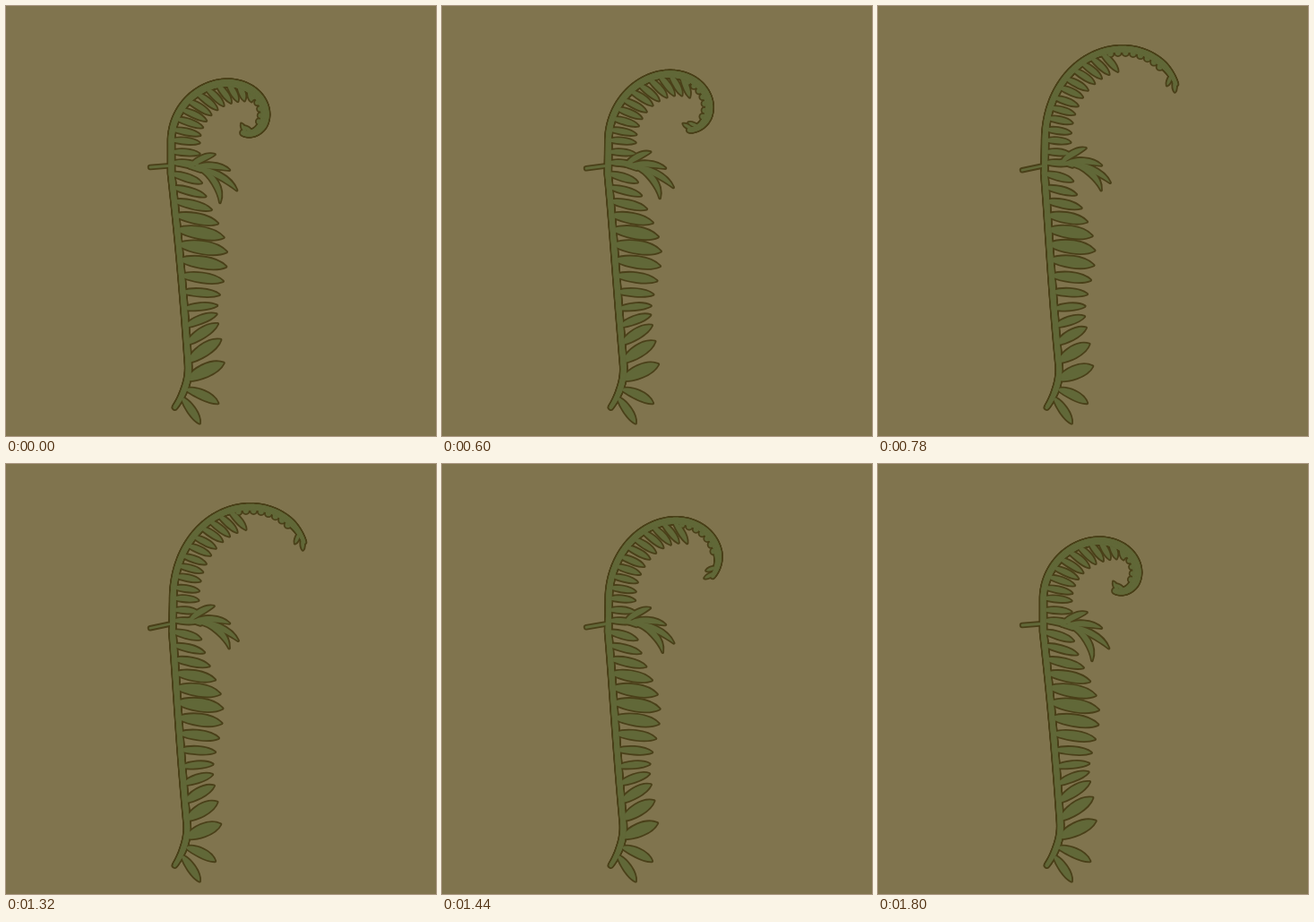
Animation of 480x480 px, one loop 2160 ms. Source, as an HTML page with a canvas:

```html
<!DOCTYPE html>
<html lang="en">
<head>
<meta charset="utf-8">
<title>Fern</title>
<style>
html, body { margin: 0; height: 100%; overflow: hidden; background: #80744e; }
canvas { display: block; width: 480px; height: 480px; }
</style>
</head>
<body>
<canvas id="stage" width="480" height="480"></canvas>
<script>
const ctx = document.getElementById('stage').getContext('2d');
const COLORS = { ground: '#80744e', line: '#4a4019', leaf: '#616838' };
const EDGE = 1.8;
const LOOP = 2160;
const FOOT = 448;   // y where the stem starts
const STEM = 296;   // height of the stem below the spiral

// The spiral's heading after s pixels is turn * s + curl * (s / 200) ^ power
const POSES = [
  { open: 0, turn: .86, curl: 125, power: 5, length: 199 },
  { open: .15, turn: .8, curl: 128, power: 5, length: 199 },
  { open: .25, turn: .72, curl: 88, power: 4, length: 214 },
  { open: .65, turn: .4, curl: 54, power: 2, length: 226 },
  { open: 1, turn: .3, curl: 52, power: 2, length: 234 }
];

// Start time and pose; a half value lies between two poses
const STEPS = [[0, 0], [420, 1], [600, 2], [720, 2.5], [780, 3], [900, 4],
  [1320, 3], [1440, 2.5], [1500, 2], [1620, 1], [1800, 0]];

// Side branch: angle and length of each leaf
const FAN = [[-27, 33], [3, 42], [28, 52], [59, 44]];

const mix = (a, b, k) => a + (b - a) * k;
const clamp = v => Math.max(0, Math.min(1, v));
const bell = (v, mid, spread) => Math.exp(-(((v - mid) / spread) ** 2));
const polar = (deg, len) => [Math.cos(deg * Math.PI / 180) * len, Math.sin(deg * Math.PI / 180) * len];

function poseAt(p) {
  const a = POSES[Math.floor(p)], b = POSES[Math.ceil(p)], out = {};
  for (const key in a) out[key] = mix(a[key], b[key], p % 1);
  return out;
}

function stemX(y, open) {
  const u = Math.max(0, (y - 187) / 213);
  const foot = Math.max(0, (y - 400) / 48);
  const sway = 3 * Math.sqrt(open) * Math.sin(4.2 * (FOOT - y) / STEM);
  return 184.5 + 19 * u + 5 * u * (1 - u) - 18 * foot ** 2 - sway;
}

// One point per pixel, from the foot to the end of the spiral
function spineOf({ open, turn, curl, power, length }) {
  const points = [], thick = mix(4.8, 2.8, open);
  for (let y = FOOT; y > FOOT - STEM; y--) {
    points.push({ x: stemX(y, open), y, heading: 0, r: mix(2, 3, clamp((FOOT - y) / 20)) });
  }
  let x = stemX(FOOT - STEM, open), y = FOOT - STEM;
  for (let s = 0; s <= length; s++) {
    const heading = turn * s + curl * (s / 200) ** power;
    const taper = mix(.55, 1, clamp((length - s) / 25));
    points.push({ x, y, heading, r: mix(3, thick, s / length) * taper });
    const [dx, dy] = polar(heading - 90, 1);
    x += dx;
    y += dy;
  }
  return points;
}

function leaf(x, y, [dx, dy], w, bend = 1) {
  const len = Math.hypot(dx, dy), ux = dx / len, uy = dy / len, reach = len - 1.5;
  const at = (k, off) => [x + ux * reach * k + uy * off, y + uy * reach * k - ux * off];
  const h = w * .67, path = new Path2D();
  path.moveTo(...at(0, 1.3));
  path.bezierCurveTo(...at(.22, bend + h * .8), ...at(.75, bend + h * 1.15), ...at(1, 0));
  path.bezierCurveTo(...at(.75, bend - h * 1.15), ...at(.22, bend - h * .8), ...at(0, -1.3));
  path.closePath();
  return { path };
}

function bud(x, y, r) {
  const path = new Path2D();
  path.arc(x, y, r, 0, 7);
  return { path };
}

function twig(x1, y1, x2, y2, r) {
  return { line: [{ x: x1, y: y1, r }, { x: x2, y: y2, r }] };
}

function stemLeaves(spine, open) {
  const count = 14, out = [];
  for (let i = 0; i < count; i++) {
    const t = i / (count - 1);
    const y = 417 - 230 * t - 10 * Math.sin(Math.PI * t);
    const dx = 33 + 22 * bell(t, .62, .25) + 9 * (1 - t) ** 9;
    const dy = 5 + 6 * t - 31 * bell(t, .1, .2);
    const w = 10 + 3.2 * Math.cos(10 * t);
    const node = spine[Math.round(FOOT - y)];
    out.push(leaf(node.x, y, [dx * (1 - .09 * open), dy * (1 - .3 * open)], w));
  }
  return out;
}

function crownLeaves(spine, open) {
  const count = 13, out = [], shrink = 17 * Math.max(0, 1 - 3 * open);
  for (let i = 0; i < count; i++) {
    const { x, y, heading } = spine[Math.round(STEM - 23 + 12.4 * i)];
    const len = mix(33, 28, open) - shrink * (i / (count - 1)) ** 4;
    out.push(leaf(x, y, polar(heading * .62 + 4, len), 6));
  }
  return out;
}

// Buds on the inner side of the coil and two prongs at its end
function coilParts(spine, open) {
  const out = [], end = spine.length - 1;
  for (let i = STEM + 136; i < end - 22; i += 9) {
    const { x, y, heading, r } = spine[i];
    const [dx, dy] = polar(heading, r + .5);
    out.push(bud(x + dx, y + dy, mix(2.6, 3.4, open)));
  }
  const prong = (back, angle) => {
    const { x, y, heading } = spine[end - back];
    return leaf(x, y, polar(heading - 90 + angle, 14), 3.5, 0);
  };
  out.push(prong(11, 55), prong(4, mix(55, 5, open)));
  return out;
}

function branchParts(open) {
  const hx = 217, hy = 183 - 8 * open;
  const leaves = FAN.map(([deg, len], i) => {
    const angle = deg - open * .008 * deg ** 2;
    return leaf(hx - 4 * (3 - i), hy - (3 - i), polar(angle, len), 6, 3 + 2 * i);
  });
  return [
    twig(161, 180 + 5 * open, 186, 178, 1.4),
    twig(186, 175, hx - 12, hy - 4, 1.6),
    twig(hx - 12, hy - 4, hx, hy, 2),
    ...leaves
  ];
}

function fern(pose) {
  const { open } = pose, spine = spineOf(pose);
  return [
    leaf(197, 438, [20, 29], 8),
    leaf(202, 428, [36 - 5 * open, 16], 9, 2),
    ...stemLeaves(spine, open),
    ...crownLeaves(spine, open),
    ...coilParts(spine, open),
    ...branchParts(open),
    { line: spine }
  ];
}

function paint(parts, color, grow) {
  ctx.fillStyle = ctx.strokeStyle = color;
  for (const { path, line } of parts) {
    if (path) {
      ctx.lineWidth = grow * 2;
      ctx.fill(path);
      if (grow) ctx.stroke(path);
      continue;
    }
    for (let i = 1; i < line.length; i++) {
      const a = line[i - 1], b = line[i];
      ctx.lineWidth = (b.r + grow) * 2;
      ctx.beginPath();
      ctx.moveTo(a.x, a.y);
      ctx.lineTo(b.x, b.y);
      ctx.stroke();
    }
  }
}

function draw(p) {
  const parts = fern(poseAt(p));
  ctx.fillStyle = COLORS.ground;
  ctx.fillRect(0, 0, 480, 480);
  ctx.lineCap = ctx.lineJoin = 'round';
  paint(parts, COLORS.line, EDGE);
  paint(parts, COLORS.leaf, 0);
}

let shown = -1;
const start = performance.now();

function tick() {
  const t = (performance.now() - start) % LOOP;
  const p = STEPS.filter(s => s[0] <= t).pop()[1];
  if (p !== shown) draw(shown = p);
  requestAnimationFrame(tick);
}
tick();
</script>
</body>
</html>
```
